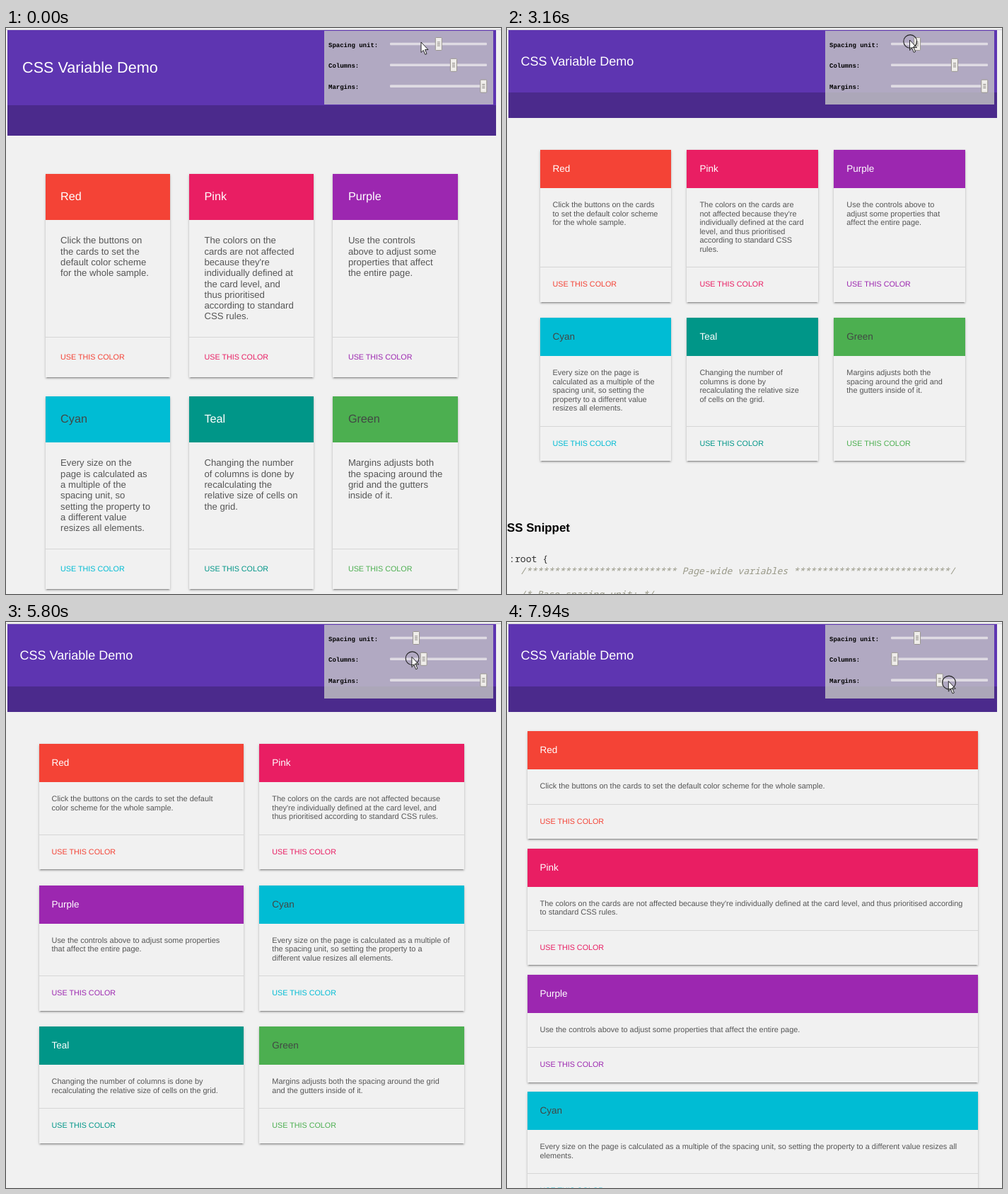
An HTML page that plays this animation: 700x799 px, repeating every 8 s.

```html
<!DOCTYPE html>
<html lang="en">
<head>
<meta charset="utf-8">
<title>CSS Variable Demo</title>
<style>
html, body { margin: 0; width: 100%; height: 100%; overflow: hidden; }
body {
  position: relative; background: #f1f1f1;
  font-family: "Liberation Sans", Arial, sans-serif;
  text-rendering: geometricPrecision;
}
#edge { position: absolute; left: 0; top: 2px; width: 100%; height: 1px; background: #cfccd6; }
#page { position: absolute; left: 1.5px; top: 3px; width: 691.2px; }
header {
  height: calc(4.9 * var(--p)); line-height: calc(4.95 * var(--p)); padding-left: var(--p);
  font-size: var(--p); color: #fff; background: #5e35b1;
}
#strip { height: calc(2 * var(--p)); background: #4b2a8c; }
#grid {
  display: grid; grid-template-columns: repeat(var(--n), minmax(0, 1fr));
  gap: calc(var(--m) / 2); margin: var(--m);
}
.card {
  display: flex; flex-direction: column;
  box-shadow: 0 2px 2px rgba(0,0,0,.16), 0 3px 1px -2px rgba(0,0,0,.2), 0 1px 4px rgba(0,0,0,.14);
}
.card h2 {
  margin: 0; padding-left: var(--p); height: calc(3 * var(--p)); line-height: calc(3 * var(--p));
  font-size: calc(.75 * var(--p)); font-weight: 400; color: #fff; background: var(--c);
}
.card p {
  flex: 1; margin: 0; padding: var(--p) calc(var(--p) - 1px) var(--p) var(--p);
  font-size: calc(.608 * var(--p)); line-height: var(--lh); font-kerning: none; color: #565656;
}
.card.tight p { padding-right: calc(var(--p) + 1.5px); }
.card.dark h2 { color: #424744; }
.card div {
  padding: var(--p); border-top: 1px solid #d6d6d6;
  font-size: 10.75px; line-height: 12.5px; color: var(--c);
}
#snippet { margin-top: 85px; white-space: pre; }
#snippet h3 { margin: 0 0 25px -13.7px; font-size: 16.85px; line-height: 20px; color: #000; }
#snippet pre {
  margin: 0 0 0 1.5px; font: 13.15px/16.7px "Noto Sans Mono", "DejaVu Sans Mono", monospace; color: #333;
}
#snippet i { color: #998; }
svg { position: absolute; left: 0; top: 0; }
svg text { font: bold 9px "Liberation Mono", monospace; }
</style>
</head>
<body>
<div id="edge"></div>
<div id="page">
  <header>CSS Variable Demo</header>
  <div id="strip"></div>
  <div id="grid"></div>
  <div id="snippet"><h3>CSS Snippet</h3><pre></pre></div>
</div>
<svg width="700" height="799">
  <rect x="450" y="4" width="239" height="104" fill="rgba(204,208,200,.75)"/>
  <g id="sliders"></g>
  <g id="cursor">
    <path d="M0 0V14.5L3.3 11.4 5.8 17.4 8 16.5 5.6 10.6H10Z" fill="#fff" stroke="#111" stroke-width=".9"/>
    <circle id="ring" cx=".7" cy="2" r="9.4" fill="none" stroke="#222" stroke-width="1.1"/>
  </g>
</svg>
<script>
const $ = id => document.getElementById(id);
const clamp = (v, lo, hi) => Math.min(hi, Math.max(lo, v));

const cards = [
  ['Red', '#f44336', '', 'Click the buttons on the cards to set the default color scheme for the whole sample.'],
  ['Pink', '#e91e63', 'tight', "The colors on the cards are not affected because they're individually defined at the card level, and thus prioritised according to standard CSS rules."],
  ['Purple', '#9c27b0', 'tight', 'Use the controls above to adjust some properties that affect the entire page.'],
  ['Cyan', '#00bcd4', 'tight dark', 'Every size on the page is calculated as a multiple of the spacing unit, so setting the property to a different value resizes all elements.'],
  ['Teal', '#009688', '', 'Changing the number of columns is done by recalculating the relative size of cells on the grid.'],
  ['Green', '#4caf50', 'dark', 'Margins adjusts both the spacing around the grid and the gutters inside of it.']
];
$('grid').innerHTML = cards.map(([name, color, cls, text]) =>
  `<div class="card ${cls}" style="--c:${color}"><h2>${name}</h2><p>${text}</p><div>USE THIS COLOR</div></div>`).join('');

const stars = n => '*'.repeat(n);
document.querySelector('pre').innerHTML =
  `:root {\n  <i>/${stars(27)} Page-wide variables ${stars(28)}/</i>\n\n  <i>/* Base spacing unit: */</i>`;

// Each slider is dragged once, from press to release
const sliders = [
  { label: 'Spacing unit:', min: 16, max: 32, step: 4, press: 1240, release: 3200 },
  { label: 'Columns:', min: 1, max: 4, step: 1, press: 4070, release: 6410 },
  { label: 'Margins:', min: .5, max: 2.5, step: .5, press: 7440, release: 8000 }
];
const trackStart = 548.3, trackLength = 127, lag = 60;

$('sliders').innerHTML = sliders.map(({ label }, i) => {
  const y = 22.5 + i * 29.8;
  return `<text x="456" y="${y + 4}">${label}</text>
    <rect x="543" y="${y - 1.8}" width="137" height="3.6" rx="1" fill="#dfdbe3"/>
    <g class="thumb"><rect x="-4.5" y="${y - 9}" width="9" height="18" rx="1" fill="#efedea" stroke="#99958f"/>
    <path d="M-2 ${y - 2.5}h4m-4 2.5h4m-4 2.5h4" stroke="#85817c"/></g>`;
}).join('');
const thumbs = document.querySelectorAll('.thumb');

// Pointer moves: [start, end, x, y]
const moves = [
  [70, 210, 581.5, 27], [210, 470, 595.5, 28], [650, 820, 613.5, 18],
  [1240, 1730, 594.5, 19], [1730, 1900, 580.5, 18.5], [2180, 2760, 569.5, 17],
  [3200, 3820, 635, 49.5], [4070, 4590, 669, 50], [4870, 5450, 576, 48],
  [5600, 6230, 569.3, 52], [6690, 7440, 672.3, 83.5], [7550, 7880, 624.3, 83.5]
];

function pointAt(t) {
  let x = 587, y = 20;
  for (const [start, end, toX, toY] of moves) {
    const f = clamp((t - start) / (end - start), 0, 1);
    x += (toX - x) * f;
    y += (toY - y) * f;
  }
  return [x, y];
}

// The thumb snaps to the stop nearest to the pointer, slightly late
function valueAt({ min, max, step, press, release }, t) {
  const x = pointAt(clamp(t - lag, press, release))[0];
  const raw = (x - trackStart) / trackLength * (max - min);
  return clamp(min + Math.round(raw / step) * step, min, max);
}

function draw(now) {
  const t = now % 8000;
  const values = sliders.map(s => valueAt(s, t));
  const [unit, columns, margin] = values;
  const pad = unit * .9, style = $('page').style;
  style.setProperty('--p', pad + 'px');
  style.setProperty('--lh', unit * .7 - 1.5 + 'px');
  style.setProperty('--m', pad * margin + 'px');
  style.setProperty('--n', columns);
  sliders.forEach(({ min, max }, i) => {
    const x = trackStart + trackLength * (values[i] - min) / (max - min);
    thumbs[i].setAttribute('transform', `translate(${x})`);
  });
  $('cursor').setAttribute('transform', `translate(${pointAt(t)})`);
  $('ring').style.opacity = +sliders.some(s => t >= s.press && t < s.release);
  requestAnimationFrame(draw);
}
draw(0);
</script>
</body>
</html>
```
